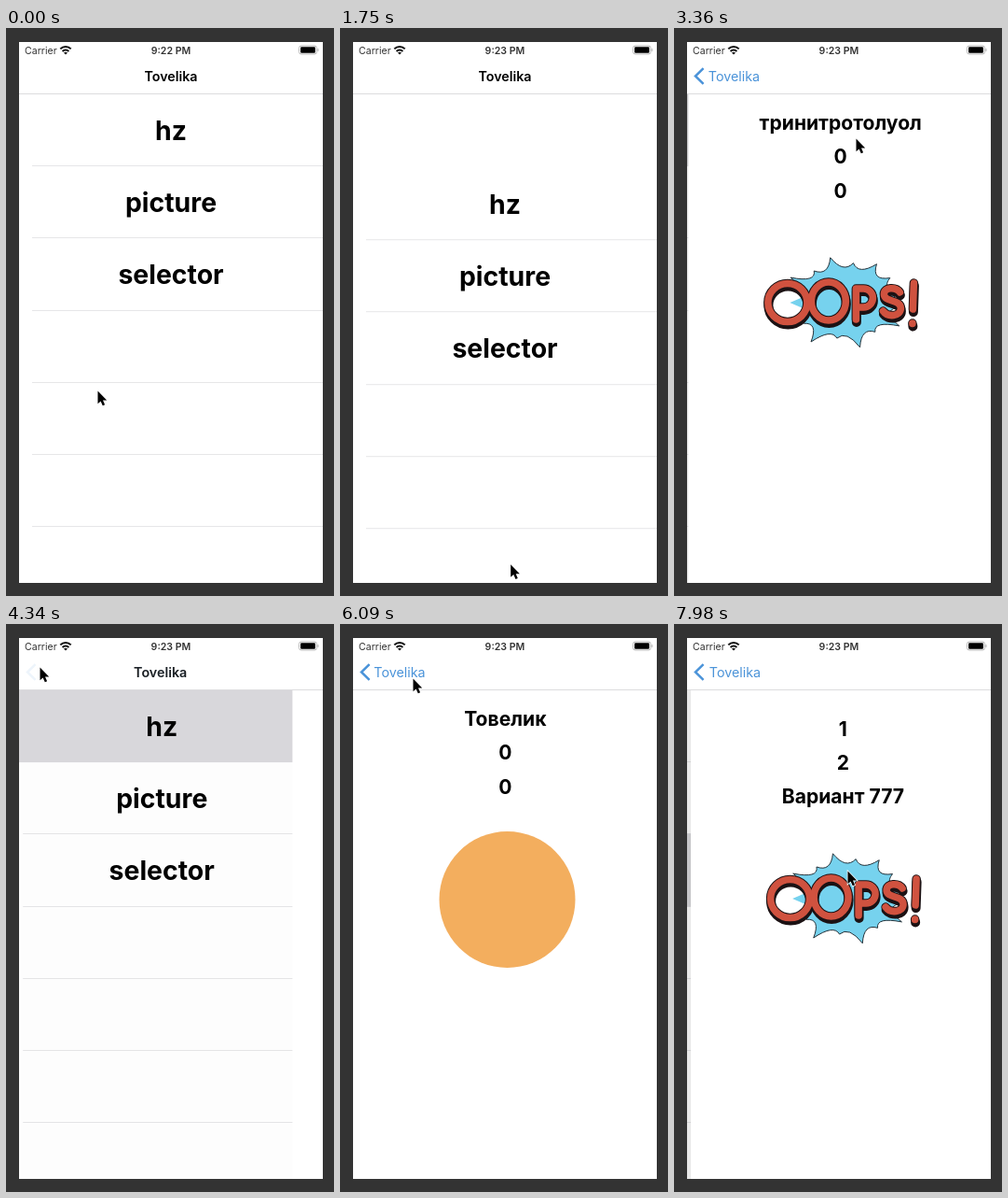
Write an HTML page that moves like this. It is 352 px wide and 608 px high and loops after 8000 ms.

```html
<!DOCTYPE html>
<html lang="en">
<head>
<meta charset="utf-8">
<title>List and details</title>
<style>
html, body { margin: 0; height: 100%; overflow: hidden; background: #333; }
svg { display: block; width: 100vw; height: 100vh; }
text { font-family: Inter, Roboto, "Liberation Sans", sans-serif; }
.mid { text-anchor: middle; }
.row { font-size: 28.4px; font-weight: 700; }
.info { font-size: 21.1px; font-weight: 700; }
.nav { font-size: 14.3px; }
.status { font-size: 10.6px; fill: #333; }
.bold { font-weight: 600; }
.blue { fill: #4a93d9; }
.line { stroke: #e6e6e8; }
</style>
</head>
<body>
<svg viewBox="0 0 352 608">
  <defs>
    <clipPath id="screen"><rect x="14" y="15" width="326" height="579"/></clipPath>
    <g id="letters" fill="none" stroke-linecap="round" stroke-linejoin="round">
      <ellipse cx="120.5" cy="294" rx="21" ry="20.5"/>
      <ellipse cx="164.5" cy="292.5" rx="18.5" ry="20.5"/>
      <path d="M194 312V279h8a9.5 9.5 0 0 1 0 20h-8"/>
      <path d="M241 283c-4-6-17-6-17 2 0 9 18 5 18 15 0 9-14 10-19 3"/>
      <path d="M256 273l-1 28M254.500 316v.5"/>
    </g>
    <g id="oops">
      <path id="burst" fill="#76d2ee" stroke="#25323a"/>
      <ellipse cx="120.5" cy="294" rx="21" ry="20.5" fill="#fff"/>
      <path d="M123 294l14-6v12z" fill="#76d2ee"/>
      <use href="#letters" x=".5" y="3" stroke="#1c1214" stroke-width="10"/>
      <use href="#letters" stroke="#1c1214" stroke-width="9.5"/>
      <use href="#letters" stroke="#d0523f" stroke-width="7.5"/>
    </g>
  </defs>
  <rect width="352" height="608" fill="#333"/>
  <g clip-path="url(#screen)">
    <g id="list">
      <rect x="14" y="14" width="326" height="580" fill="#fff"/>
      <g id="rows"></g>
    </g>
    <rect id="dim" x="14" y="14" width="326" height="580"/>
    <g id="detail">
      <rect x="14" y="14" width="326" height="580" fill="#fff"/>
      <g class="page"><use href="#oops"/></g>
      <g class="page"><circle cx="179.5" cy="295" r="73" fill="#f3ae5e"/></g>
      <g class="page"><use href="#oops"/></g>
    </g>
    <rect x="14" y="14" width="326" height="56" fill="#fff"/>
    <path d="M14 70.5H340" stroke="#dcdcde"/>
    <text id="title" class="nav mid bold" y="56.5">Tovelika</text>
    <text id="back" class="nav mid blue" y="56.5">Tovelika</text>
    <path id="chevron" d="M31.600 43.200l-8.600 8.300 8.600 8.300" fill="none" stroke="#4a93d9" stroke-width="2.5"/>
    <text class="status" x="20" y="28">Carrier</text>
    <text id="clock" class="status mid bold" x="177" y="28"></text>
    <g fill="none" stroke="#111" stroke-width="2">
      <path d="M58.300 22.400a8 8 0 0 1 11.400 0M60.600 25a4.800 4.800 0 0 1 6.800 0"/>
      <path d="M64 28.600l-2-2a2.900 2.900 0 0 1 4 0z" fill="#111" stroke="none"/>
    </g>
    <rect x="314.500" y="19" width="19" height="9" rx="2.500" fill="#fff" stroke="#b5b5b5"/>
    <rect x="316" y="20.300" width="16" height="6.400" rx="1.300"/>
    <path d="M335 22v3" stroke="#b5b5b5"/>
  </g>
  <g id="cursor">
    <path d="M.5.6v13.600l3.100-2.800 2.200 4.900 2.300-1-2.100-4.700h4.200z" stroke="#fff" stroke-width="1.500" paint-order="stroke"/>
  </g>
</svg>
<script>
const LOOP = 8000, WIDTH = 326, ROW = 77.2, TOP = 70;
const $ = id => document.getElementById(id);
const move = (el, x, y = 0) => el.setAttribute('transform', `translate(${x} ${y})`);
const show = (el, on) => el.style.display = on ? '' : 'none';

function add(parent, tag, attrs, text = '') {
  const el = document.createElementNS('http://www.w3.org/2000/svg', tag);
  for (const k in attrs) el.setAttribute(k, attrs[k]);
  el.textContent = text;
  return parent.appendChild(el);
}

// List rows: separators, then selection fills, then labels
for (let k = 1; k < 9; k++) {
  const y = Math.round(TOP + ROW * k) + .5;
  add($('rows'), 'path', { class: 'line', d: `M28 ${y}H340` });
}
const names = ['hz', 'picture', 'selector'];
const fills = names.map((n, k) => add($('rows'), 'rect',
  { x: 14, y: TOP + ROW * k, width: WIDTH, height: ROW + .9, fill: '#dad9dd' }));
names.forEach((n, k) => add($('rows'), 'text',
  { class: 'row mid', x: 177, y: TOP + 49.8 + ROW * k }, n));

// Detail pages
const pages = [...document.querySelectorAll('.page')];
[[109, 'тринитротолуол', '0', '0'], [109, 'Товелик', '0', '0'], [119.5, '1', '2', 'Вариант 777']]
  .forEach(([y, ...lines], p) => lines.forEach((s, i) =>
    add(pages[p], 'text', { class: 'info mid', x: 177.3, y: y + 36.4 * i }, s)));

// Burst: uneven spikes around an ellipse, joined by curves that sag inwards
const SPIKES = 16;
function rim(i, r) {
  const a = (i + .4) * 2 * Math.PI / SPIKES;
  return `${182 + 58 * r * Math.cos(a)} ${293 + 42 * r * Math.sin(a)}`;
}
const spike = i => rim(i, 1.07 + .13 * Math.sin(3 * (i % SPIKES) - .86));
let burst = 'M' + spike(0);
for (let i = 0; i < SPIKES; i++) burst += `Q${rim(i + .5, .72)} ${spike(i + 1)}`;
$('burst').setAttribute('d', burst + 'Z');

// Pointer moves: start, end, x, y; it rests in between
const moves = [
  [0, 0, 98, 388], [70, 280, 98, 434], [280, 560, 194, 112], [560, 840, 140, 404],
  [1050, 1330, 142, 252], [1330, 1820, 185, 592],                    // drag the list
  [1890, 2310, 189, 210], [2310, 2590, 195, 118],                    // to the first row
  [3500, 3640, 248, 313], [3640, 3990, 36, 46],                      // to the back button
  [4340, 4900, 168, 177],                                            // to the second row
  [5810, 6090, 78, 58], [6090, 6200, 42, 50], [6200, 6440, 160, 284], [6510, 6720, 42, 52],
  [6930, 7420, 186, 264]];                                           // to the third row

function pointer(t) {
  let x = 0, y = 0;
  for (const [from, to, tx, ty] of moves) {
    if (t < from) break;
    const u = Math.min(1, (t - from) / (to - from || 1)), s = to ? u * u * (3 - 2 * u) : 1;
    x += (tx - x) * s;
    y += (ty - y) * s;
  }
  return [x, y];
}

const settle = (t, w) => (1 + w * t) * Math.exp(-w * t);
const rubber = d => Math.sign(d) * 524 * (1 - 1 / (Math.abs(d) * .55 / 524 + 1));

// The list follows the pointer while held, then springs back
const GRAB = 1050, RELEASE = 1890;
function scroll(t) {
  if (t < GRAB) return 0;
  const pull = rubber(pointer(Math.min(t, RELEASE))[1] - pointer(GRAB)[1]);
  return t < RELEASE ? pull : pull * settle(t - RELEASE, .0112);
}

// Visits to each detail page: touch, push, pop
const visits = [[2710, 2870, 4090], [5100, 5170, 6820], [7550, 7570, LOOP]];

function shown(t, [, push, pop]) {
  if (t < push) return 0;
  const left = settle(t - (t < pop ? push : pop), .0155);
  return t < pop ? 1 - left : left;
}

function draw(t) {
  const parts = visits.map(v => shown(t, v));
  const e = Math.max(...parts), page = parts.indexOf(e);
  move($('list'), -.3 * WIDTH * e);
  move($('rows'), 0, scroll(t));
  move($('detail'), WIDTH * (1 - e));
  $('dim').setAttribute('opacity', .09 * e);
  pages.forEach((p, i) => show(p, i === page));
  // A row stays selected until the next page is pushed
  fills.forEach((f, i) => show(f, t >= visits[i][0] && !(t >= visits[i + 1]?.[1])));
  for (const id of ['title', 'back']) $(id).setAttribute('x', 177 - 113 * e);
  $('title').setAttribute('opacity', 1 - e);
  $('back').setAttribute('opacity', e);
  $('chevron').setAttribute('opacity', e);
  $('clock').textContent = t < 1050 ? '9:22 PM' : '9:23 PM';
  move($('cursor'), ...pointer(t));
}

const start = performance.now();
function tick() {
  draw((performance.now() - start) % LOOP);
  requestAnimationFrame(tick);
}
tick();
</script>
</body>
</html>
```
